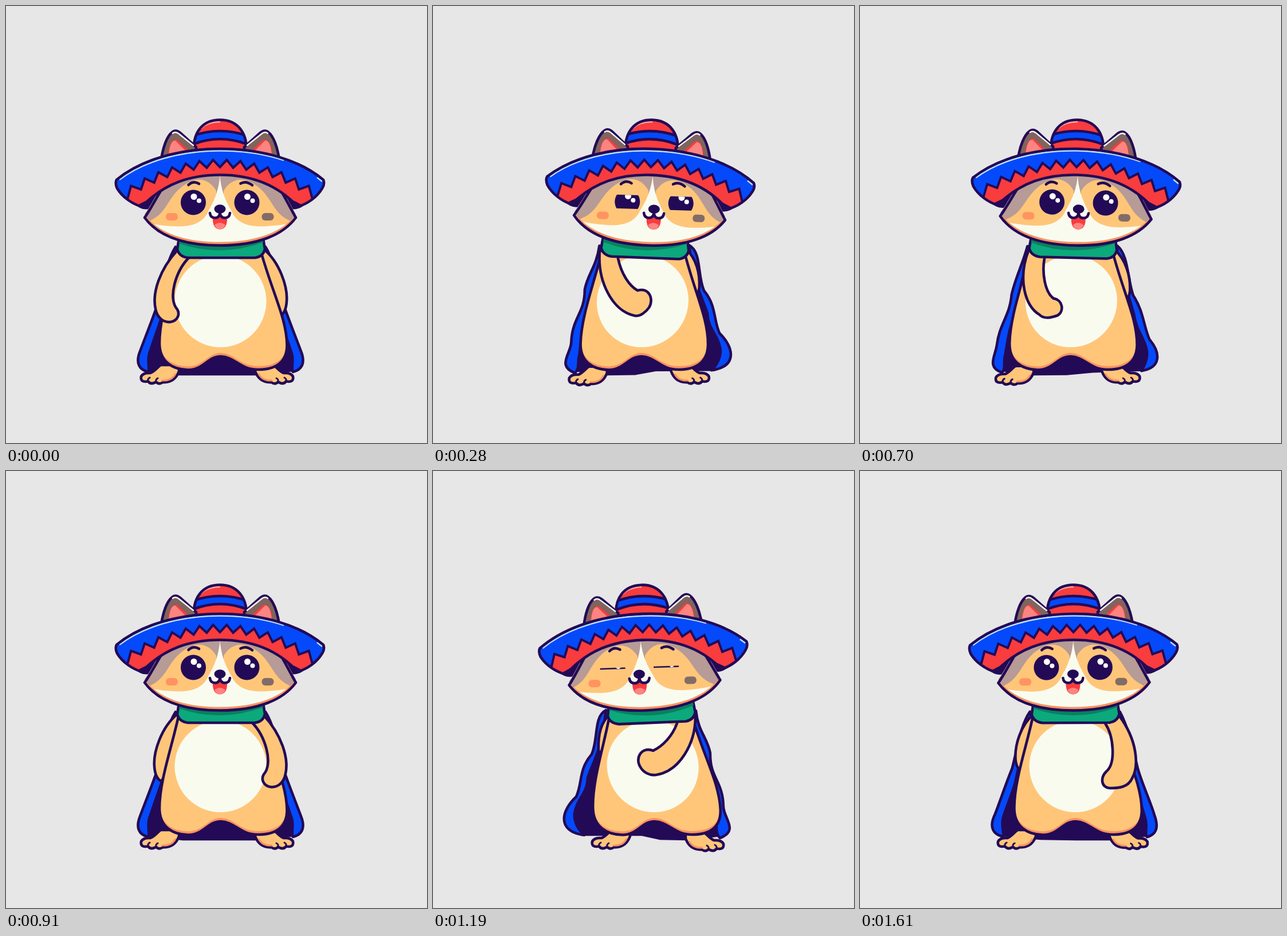
An HTML page that plays this animation: 735x762 px, repeating every 1680 ms.

```html
<!DOCTYPE html>
<html lang="en">
<head>
<meta charset="utf-8">
<title>Dancing corgi</title>
<style>
  html, body { margin: 0; width: 100%; height: 100%; overflow: hidden; background: #e7e7e7; }
  svg { display: block; width: 100vw; height: 100vh; }
  .line { stroke: #230a56; stroke-width: 4.6; stroke-linejoin: round; stroke-linecap: round; }
  .navy { fill: #230a56; }
  .blue { fill: #044afb; }
  .red { fill: #f93c3e; }
  .peach { fill: #ffc679; }
  .orange { fill: #fb9160; }
  .cream { fill: #fafbef; }
  .mauve { fill: #b69b96; }
  .open { fill: none; }
</style>
</head>
<body>
<svg viewBox="0 0 735 762">
  <defs>
    <path id="bodyShape" d="M301 428C290 480 268 540 268 588C268 620 290 634 318 634.500C346 634 352 611 375 611C400 612 408 634 440 634C470 634 490.500 622 490.500 591C490 545 465 500 445 428Z"/>
    <path id="headShape" d="M242 369C254 352 262 335 280 306L300 270H450L470 306C486 330 496 352 506 369C484 399 440 417.500 374 417.500C306 417.500 264 399 242 369Z"/>
    <path id="brimShape" d="M193 303C236 268 302 249 373.500 249C446 249 512 268 554 303Q557 310 552 318C543 333 527 345 509 350C472 309 425 294.500 373.500 294.500C322 294.500 276 309 237 350C220 345 203 333 194 318Q190 309 193 303Z"/>
    <path id="crownShape" d="M328 254C326 218 345 198.500 373.500 198.500C402 198.500 421 218 420 254Z"/>
    <clipPath id="bodyClip"><use href="#bodyShape"/></clipPath>
    <clipPath id="faceClip"><use href="#headShape" y="-6"/></clipPath>
    <clipPath id="brimClip"><use href="#brimShape"/></clipPath>
    <clipPath id="crownClip"><use href="#crownShape"/></clipPath>
    <clipPath id="lidClip"><rect id="lids" x="290" width="170"/></clipPath>

    <g id="foot">
      <path class="line peach" d="M302 637C297 650 288 657 274 656Q267 661 262 655.500Q253 661 248 654.500Q234 657 236 646Q240 639 252 640C260 637 264 630 270 626L302 626Z"/>
      <path class="line open" style="stroke-width:3" d="M248 654Q247 650 251 648M262 655Q261 651 265 649"/>
      <path d="M272 653Q290 654 296 641" class="open" stroke="#fb9160" stroke-width="3"/>
    </g>
    <g id="ear">
      <path class="line" fill="#80645d" d="M271 268C274 246 281 227 290 220Q296 215 304 221L332 246V268Z"/>
      <path class="red" d="M283 262C284 243 289 232 298 233L316 249V262Z"/>
      <path fill="#fd8480" d="M284 262C285 243 290 233 296 235L313 252V262Z"/>
      <path class="open" stroke="#fff" stroke-width="2.400" stroke-linecap="round" d="M291 222Q296 218 302 223L327 243"/>
    </g>
    <g id="eye">
      <circle class="navy" cx="327" cy="342.500" r="22"/>
      <circle fill="#fff" cx="328" cy="332.500" r="5.500"/>
      <circle fill="#fff" cx="337" cy="339.500" r="4"/>
    </g>
    <path id="patch" class="peach" d="M236 379C288 368 276 328 322 306C340 298 357 305 367 322V390H236Z"/>
  </defs>

  <rect width="735" height="762" fill="#e7e7e7"/>

  <g id="back">
    <path id="lining" class="line navy"/>
    <path id="capeL" class="line blue"/>
    <path id="capeR" class="line blue"/>
    <path id="rearArm" class="line peach"/>
  </g>
  <use id="footL" href="#foot"/>
  <use id="footR" href="#foot"/>
  <g id="body">
    <use href="#bodyShape" class="orange"/>
    <g clip-path="url(#bodyClip)">
      <use href="#bodyShape" y="-6" class="peach"/>
      <circle class="cream" cx="374.500" cy="515" r="80"/>
    </g>
    <use href="#bodyShape" class="line open"/>
  </g>
  <g id="front"><path id="foreArm" class="line peach"/></g>

  <g id="scarf">
    <path class="line" fill="#0ba97b" d="M302 405L299 424Q302 437 318 439H435Q449 437 452 424L449 405Z"/>
    <path fill="#0a7f61" d="M303 408L302 414Q374 439 449 412V406Z"/>
  </g>

  <g id="head">
    <path class="line navy" d="M226 343Q236 354 248 352L300 300H447L499 352Q512 353 522 343L470 295H270Z"/>
    <use href="#headShape" class="orange"/>
    <g clip-path="url(#faceClip)">
      <rect class="mauve" x="235" y="260" width="280" height="160"/>
      <g id="mask">
        <use href="#patch"/>
        <use href="#patch" transform="translate(747) scale(-1 1)"/>
        <path class="cream" d="M373.500 296C371 325 362 342 353 358C344 380 320 386 292 384Q262 383 230 374V425H517V374Q485 383 455 384C427 386 403 380 394 358C385 342 376 325 373.500 296Z"/>
      </g>
    </g>
    <use href="#headShape" class="line open"/>
    <g id="cheeks">
      <rect x="279" y="361" width="21" height="13" rx="6" fill="#ff9460"/>
      <rect x="446.500" y="361" width="21" height="13" rx="6" fill="#826c67"/>
    </g>
    <path id="brows" class="line open" d="M318.500 312Q327 304 337 310M409.500 309.500Q419 304 430 312.500"/>
    <g id="eyes" clip-path="url(#lidClip)">
      <use href="#eye"/>
      <use href="#eye" x="93.500"/>
    </g>
    <g id="muzzle">
      <path class="red" d="M361 368H386Q387 389 373.500 389.500Q360 389 361 368Z"/>
      <path fill="#fd8480" d="M364 382Q373 374 383 382Q380 389.500 373.500 389.500Q367 389.500 364 382Z"/>
      <path class="line cream" d="M356 361Q357 369.500 365 369.500Q373 369.500 373.500 360Q374 369.500 382 369.500Q390 369.500 391 361"/>
      <ellipse class="navy" cx="373.500" cy="354" rx="10" ry="7.800"/>
    </g>

    <use href="#crownShape" class="red"/>
    <g clip-path="url(#crownClip)">
      <path class="line blue" d="M322 228Q373 208 426 228V243Q373 221 322 243Z"/>
      <path class="open" stroke="#fda9a6" stroke-width="2.500" d="M340 214Q352 202 374 202"/>
    </g>
    <use href="#crownShape" class="line open"/>
    <use href="#ear"/>
    <use href="#ear" transform="translate(748) scale(-1 1)"/>
    <use href="#brimShape" class="blue"/>
    <g clip-path="url(#brimClip)">
      <path id="zigzag" class="line red" style="stroke-width:4;stroke-linejoin:miter"/>
      <path class="open" stroke="#bfe0fd" stroke-width="2.600" d="M198 303C240 271 304 252.500 373.500 252.500C420 252.500 455 259 485 269M543 299L552 306"/>
    </g>
    <use href="#brimShape" class="line open"/>
  </g>
</svg>

<script>
const LOOP = 1680, STEP = 70, TURN = 910, AXIS = 749;
const $ = id => document.getElementById(id);

// Paths are kept as text; numbers of like paths are blended.
const nums = d => d.match(/-?[\d.]+/g).map(Number);
const flip = d => { let i = 0; return d.replace(/-?[\d.]+/g, n => i++ % 2 ? n : AXIS - n); };
const blend = (a, b, k) => {
  const to = nums(b);
  let i = 0;
  return a.replace(/-?[\d.]+/g, n => (+n + (to[i++] - n) * k).toFixed(2));
};

const strip = 'M296 420C280 445 272 490 264 522C255 548 243 578 234 602C226 622 232 634 248 638C252 632 246 622 250 606C256 588 263 568 271 545C280 500 288 460 300 432Z';
const cape = {
  left: [strip, 'M290 418C286 455 270 465 265 492C266 535 243 540 242 585C242 605 214 627 248 640C257 632 252 620 256 608C260 575 258 560 271 530C277 495 282 470 296 432Z'],
  right: [flip(strip), 'M447 417C469 428 460 468 472 494C495 520 488 545 499 568C525 592 534 628 485 635C495 626 503 612 502 598C498 570 480 565 479 535C469 505 456 490 449 432Z'],
  lining: ['M300 425L268 540L246 635L300 642L374 642L440 642L502 635L502 608L481 540L449 425Z',
           'M294 425L266 535L248 635L300 642L352 641L384 634L490 634L507 605L483 540L450 425Z']
};
const rear = ['M450 424C478 447 492 490 490 515C489 530 484 538 478 541C462 520 450 480 440 440',
              'M440 424C456 438 461 462 460 486C459 494 455 497 451 496C446 480 440 460 434 440'];
const arm = [
  'M299 426C268 460 255 500 261 528C264 545 276 552 287 551C300 549 304 537 299 529C282 510 296 462 320 438',
  'M297 426C264 470 262 515 274 536C281 552 298 553 313 553C328 552 330 535 319 524C302 510 306 462 321 440',
  'M291 428C287 480 313 532 352 540C362 542 372 533 377 526C386 512 378 490 357 496C343 488 329 468 323 440',
  'M291 428C292 472 320 518 360 525C375 528 386 521 390 514C403 497 388 475 368 484C350 476 332 460 323 440'
];

const sway = [[0, 0], [140, .42], [280, .92], [420, 1.05], [560, 1], [735, .5], [910, 0],
  [1050, -.5], [1190, -1], [1260, -1.02], [1400, -.8], [1610, -.12], [1680, 0]];
const swing = [[0, 0], [140, .8], [280, 2], [420, 3.1], [490, 3.2], [560, 3], [700, 1.5], [840, .3],
  [910, 0], [1050, 1], [1190, 2.7], [1295, 3.1], [1400, 2.7], [1610, 1], [1680, .5]];

// Smooth curve through a table of [time, value].
function track(keys, t) {
  let i = 0;
  while (i < keys.length - 2 && t >= keys[i + 1][0]) i++;
  const [t0, v0] = keys[i], [t1, v1] = keys[i + 1];
  const before = keys[i - 1] || keys[i], after = keys[i + 2] || keys[i + 1];
  const span = t1 - t0, u = (t - t0) / span;
  const m0 = (v1 - before[1]) / (t1 - before[0]) * span;
  const m1 = (after[1] - v0) / (after[0] - t0) * span;
  const u2 = u * u, u3 = u2 * u;
  return (2 * u3 - 3 * u2 + 1) * v0 + (u3 - 2 * u2 + u) * m0 + (3 * u2 - 2 * u3) * v1 + (u3 - u2) * m1;
}

function zigzag() {
  const teeth = 14, points = [];
  for (let i = 0; i <= teeth * 2; i++) {
    const s = i / teeth - 1, reach = i % 2 ? -6.5 : 6.5;
    points.push([373.5 + s * (164 - reach * .5), 274.5 + 53 * s * s + reach]);
  }
  return 'M' + points.map(p => p.map(v => v.toFixed(1)).join(' ')).join('L') +
    'L545 365C480 325 430 312 373 312C317 312 267 325 202 365Z';
}

const move = (id, x, y = 0) => $(id).setAttribute('transform', `translate(${x} ${y})`);
const shape = (id, d) => $(id).setAttribute('d', d);

function draw(time) {
  const t = Math.floor((time % LOOP) / STEP) * STEP;
  const q = track(sway, t), w = Math.abs(q), a = Math.max(0, track(swing, t));
  const right = Math.max(0, q), left = Math.max(0, -q);

  const side = t < TURN ? '' : `translate(${AXIS}) scale(-1 1)`;
  $('back').setAttribute('transform', side);
  $('front').setAttribute('transform', side);
  shape('lining', blend(...cape.lining, w));
  shape('capeL', blend(...cape.left, w));
  shape('capeR', blend(...cape.right, w));
  shape('rearArm', blend(...rear, Math.min(1, a / 2.4)));
  const i = Math.min(2, Math.floor(a));
  shape('foreArm', blend(arm[i], arm[i + 1], a - i));

  move('footL', 2 * right + 42 * left, 3 * right);
  $('footR').setAttribute('transform', `translate(${737 - 21 * right + 6 * left} ${4 * left}) scale(-1 1)`);
  $('body').setAttribute('transform', `matrix(1 0 ${-.0275 * q} 1 ${4.9 * q} 0)`);
  $('scarf').setAttribute('transform', `translate(${-6 * q}) rotate(${2.4 * q} 375 425)`);

  $('head').setAttribute('transform', `rotate(${1.95 * q} 373.5 500)`);
  move('mask', 4 * q);
  move('cheeks', 3 * q);
  move('brows', 4 * q);
  move('eyes', 8 * q);
  move('muzzle', 8.5 * q);

  const lid = Math.min(1, Math.max(.05, Math.min(Math.abs(t - 350), Math.abs(t - 1190)) / 145));
  $('lids').setAttribute('y', 342.5 - 25 * lid);
  $('lids').setAttribute('height', 50 * lid);
}

shape('zigzag', zigzag());
let start;
function tick(now) {
  start ??= now;
  draw(now - start);
  requestAnimationFrame(tick);
}
draw(0);
requestAnimationFrame(tick);
</script>
</body>
</html>
```
